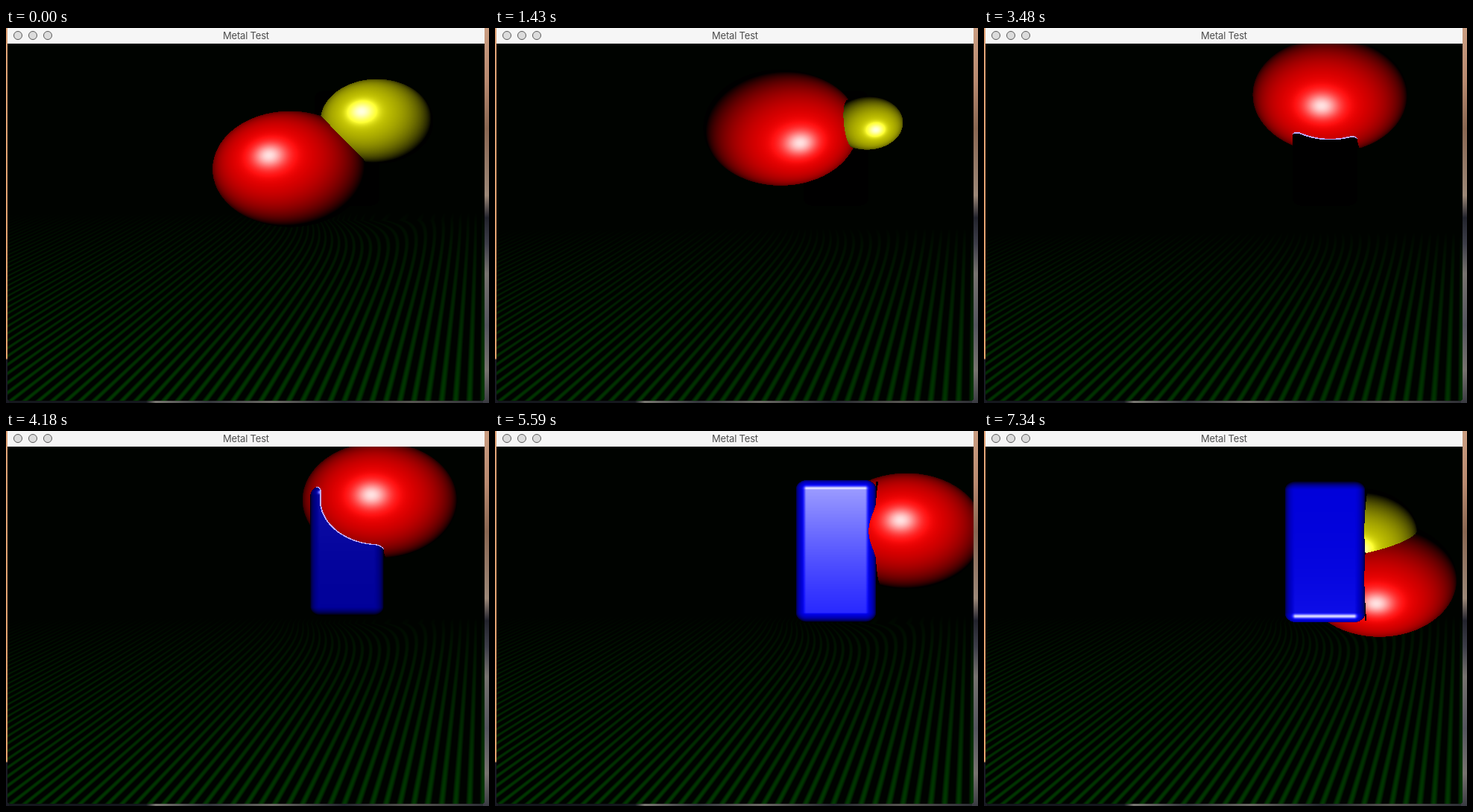
An HTML page with a canvas for the animation above (7.44 s loop, 648 px wide and 504 px high).

```html
<!DOCTYPE html>
<html lang="en">
<head>
<meta charset="utf-8">
<title>Metal Test</title>
<style>
  html, body { margin: 0; width: 648px; height: 504px; overflow: hidden; }
  body { position: relative; background: linear-gradient(90deg, #15171d 0 29%, #77756f 31%, #33353b 42%, #6a6863 55%, #24262d 70%, #55534f 84%, #2b2c33); }
  .left, .right { position: absolute; top: 0; height: 504px; }
  .left { left: 0; width: 4px; background: linear-gradient(#dfa277 0, #e3a06b 444px, #1a1b24 446px); }
  .right { right: 0; width: 8px; background: linear-gradient(#c99c80 0, #b98a70 70px, #8a6752 135px, #9c8878 225px, #23242d 255px, #3d3e48 290px, #77736f 330px, #55555e 400px, #77736f 460px, #3a3b42); }
  .window { position: absolute; left: 2px; top: 0; width: 640px; height: 501px; background: #000; border-radius: 0 0 4px 4px; overflow: hidden; }
  .bar { height: 20px; background: #f6f6f6; border-bottom: 1px solid #f0f0f0; text-align: center;
    font: 13px/21px Inter, Roboto, sans-serif; letter-spacing: -.2px; color: #4c4c4c; }
  .bar i { position: absolute; top: 4px; width: 10px; height: 10px; border: 1px solid #5b5b5b; border-radius: 50%; background: #dcdcdc; }
  canvas { display: block; }
</style>
</head>
<body>
<div class="left"></div>
<div class="right"></div>
<div class="window">
  <div class="bar"><i style="left:8px"></i><i style="left:28px"></i><i style="left:48px"></i>Metal Test</div>
  <canvas id="view" width="640" height="480"></canvas>
</div>
<script>
const W = 640, H = 480, LEFT = 2, TOP = 21, LOOP = 7440, LAST = 7340;
const RX = 104, RY = 78;                 // pixels per scene unit
const RAD = Math.PI / 180;
const RED = [1, 0, 0], YELLOW = [.82, .82, 0], BLUE = [0, 0, .95];

const ctx = document.getElementById('view').getContext('2d');
const image = ctx.createImageData(W, H);
const px = image.data;
const pixels = new Uint32Array(px.buffer);
const backdrop = new Uint32Array(new Uint8Array([0, 3, 0, 255]).buffer)[0];

const clamp = (v, lo, hi) => Math.min(hi, Math.max(lo, v));

function ease(from, to, t) {
  const u = clamp((t - from) / (to - from), 0, 1);
  return u * u * (3 - 2 * u);
}

function pose(t) {
  const orbit = (.0336 * t - 27) * RAD;
  const reach = 1 - .05 * Math.sin(2 * orbit);
  const drift = t / LAST;
  const calm = Math.exp(-(((t - 2500) / 900) ** 2));
  return {
    red: { x: 464 - 90 * reach * Math.cos(orbit), y: 157 - 68 * reach * Math.sin(orbit), z: 0, r: 1 },
    yellow: {
      x: 497 + 7 * drift, y: 125 + 9 * drift,
      z: .25 * (1 - Math.exp(-t / 700)),
      r: .73 * Math.abs(t / 3650 - 1) ** .9
    },
    light: lamp(
      -.27 + .52 * ease(0, 1430, t) - .36 * ease(1430, 2360, t) + .07 * ease(4000, LAST, t),
      .1 - .36 * Math.cos(2 * orbit + 75 * RAD)),
    boxLight: lamp(-.02, -.4 + .84 * ease(4820, LAST, t)),
    boxZ: -1 + 1.65 * ease(1430, 3480, t) + .4 * ease(4820, 6230, t),
    boxScale: .8 + .19 * ease(3480, 4820, t),
    boxGlow: ease(3480, 4600, t),
    seam: .03 * Math.max(0, 1 - Math.abs(t - 3700) / 1800),
    horizon: 246 + 86 * calm,
    green: 57 - 15 * calm,
    bend: 1 - calm
  };
}

// Unit vector towards the highlight
function lamp(x, y) {
  return { x, y, z: Math.sqrt(1 - x * x - y * y) };
}

function shade(o, color, nx, ny, nz, l, glow = 1, shift = 0) {
  const diffuse = 255 * Math.max(0, nx * l.x + ny * l.y + nz * l.z);
  const dx = nx - l.x, dy = ny - l.y - shift, dz = nz - l.z;
  const shine = 225 * Math.exp(-20 * (dx * dx + dy * dy + dz * dz));
  for (let c = 0; c < 3; c++) px[o + c] = glow * (color[c] * diffuse + shine);
}

function paint(o, r, g, b) {
  px[o] = r; px[o + 1] = g; px[o + 2] = b;
}

function drawFloor(p) {
  const end = TOP + H;
  for (let y = Math.ceil(p.horizon); y < end; y++) {
    const far = y - 10, rate = 26.3 / far;
    const power = p.green * ((y - p.horizon) / (end - p.horizon)) ** .6;
    const warp = 60 * p.bend * Math.exp(-Math.max(0, y - 258) / 22);
    for (let x = LEFT; x < LEFT + W; x++) {
      const side = 640 - x - warp * Math.exp(-(((x - 470) / 80) ** 2));
      const contrast = clamp(1.4 - 2.4 * rate * Math.hypot(1, side / far), .25, 1);
      const wave = contrast * Math.cos(2 * Math.PI * rate * side);
      px[((y - TOP) * W + x - LEFT) * 4 + 1] = Math.max(3, power * (wave + .3) / 1.3);
    }
  }
}

// Depth of a ball's front at a pixel
function ballDepth(ball, x, y) {
  const dx = (x - ball.x) / RX, dy = (y - ball.y) / RY;
  const left = ball.r * ball.r - dx * dx - dy * dy;
  return left > 0 ? ball.z + Math.sqrt(left) : -9;
}

function drawBall(o, ball, color, x, y, z, light) {
  const r = ball.r;
  shade(o, color, (x - ball.x) / RX / r, (y - ball.y) / RY / r, (z - ball.z) / r, light);
}

// How far a coordinate lies into the rounded rim: 0 on the flat, 1 at the outline
const rim = (v, flat, round) => Math.sign(v) * Math.max(0, Math.abs(v) - flat) / round;

function drawSolids(p) {
  for (let y = TOP; y < 290; y++) {
    const b = (y - 161) / p.boxScale, qy = rim(b, 83.5, 13);
    for (let x = 260; x < LEFT + W; x++) {
      const o = ((y - TOP) * W + x - LEFT) * 4;
      const redZ = ballDepth(p.red, x, y), yellowZ = ballDepth(p.yellow, x, y);
      const ballZ = Math.max(redZ, yellowZ);

      const a = (x - 457) / p.boxScale, qx = rim(a, 39.5, 15);
      const q = 1 - qx * qx - qy * qy, nz = Math.sqrt(Math.max(0, q));
      let boxZ = -9;
      if (q > 0) boxZ = p.boxZ - .12 * (1 - nz);
      else if (a >= 54 && a < 62 && Math.abs(b) < 94) boxZ = p.boxZ - .1 - (a - 54) / 9;   // unlit right side

      if (boxZ > ballZ) {
        if (q <= 0) {
          if (ballZ > -9) paint(o, 0, 0, 0);
        } else if (boxZ - redZ < p.seam) paint(o, 190, 170, 255);
        else shade(o, BLUE, qx, qy, nz, p.boxLight, p.boxGlow, -.08 * clamp(b / 86, -1, 1));
      } else if (yellowZ > redZ) {
        drawBall(o, p.yellow, YELLOW, x, y, yellowZ, p.light);
      } else if (redZ > -9) {
        drawBall(o, p.red, RED, x, y, redZ, p.light);
      }
    }
  }
}

const start = performance.now();

function frame() {
  const p = pose(Math.min((performance.now() - start) % LOOP, LAST));
  pixels.fill(backdrop);
  drawFloor(p);
  drawSolids(p);
  ctx.putImageData(image, 0, 0);
  requestAnimationFrame(frame);
}
frame();
</script>
</body>
</html>
```
